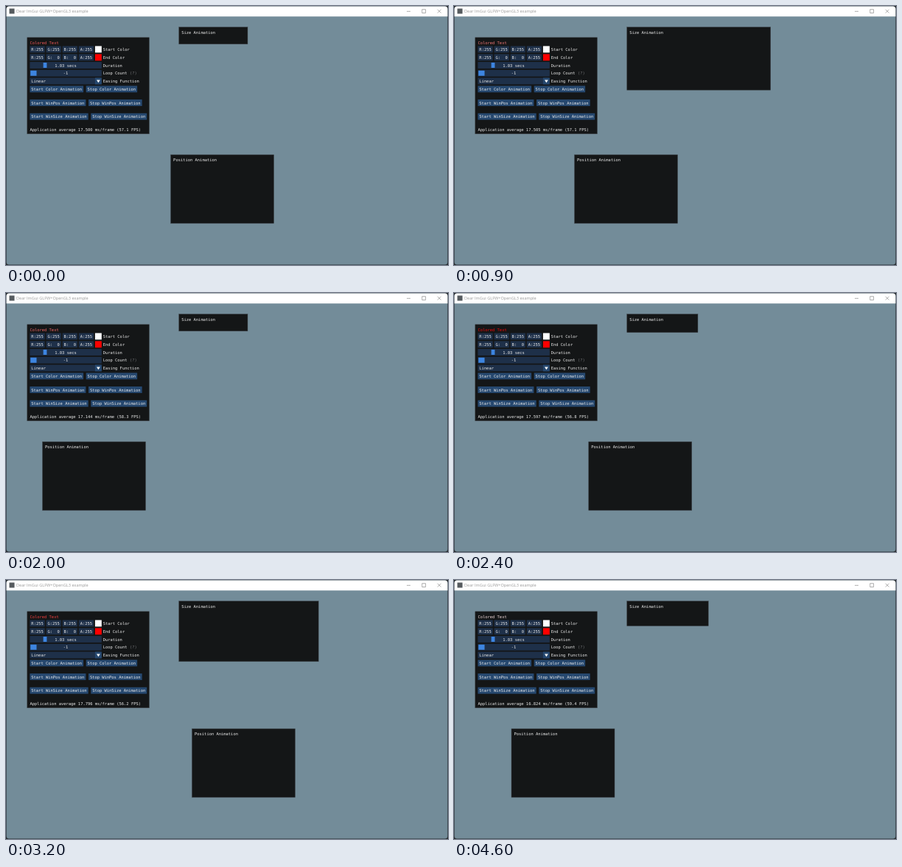
These frames come from a looping animation (600x352 px, 4.7 s). An HTML page:

```html
<!DOCTYPE html>
<html lang="en">
<head>
<meta charset="utf-8">
<title>Animated windows</title>
<style>
  html, body { margin: 0; width: 100%; height: 100%; overflow: hidden; background: #24292c; }
  svg { display: block; width: 600px; height: 352px; }
  text { font: 5.45px "DejaVu Sans Mono", monospace; fill: #e8e8e8; white-space: pre; }
  .title { font: 5.6px "Open Sans", sans-serif; fill: #999; }
  .mid { text-anchor: middle; }
  .dim { fill: #707274; }
  .window { fill: #141617; stroke: #3c4046; stroke-width: .5; }
  .frame { fill: #1e3049; }
  .button { fill: #26486f; }
  .grab { fill: #3d85e0; }
  .control { fill: none; stroke: #777; stroke-width: .6; }
</style>
</head>
<body>
<svg id="stage" viewBox="0 0 600 352">
  <rect x=".6" y=".4" width="598.8" height="351" rx="3.5" fill="#738c99"/>
  <path d="M.6 14.3V3.9a3.5 3.5 0 0 1 3.5-3.5H595.9a3.5 3.5 0 0 1 3.5 3.5V14.3z" fill="#fff"/>
  <rect x="4.5" y="3.5" width="7" height="7" fill="#555a5e"/>
  <text class="title" x="14" y="9.3">Dear ImGui GLFW+OpenGL3 example</text>
  <path class="control" d="M544 7.3h5M564.8 4.7h4.8v4.8h-4.8zM585.8 4.7l4.8 4.8m0-4.8l-4.8 4.8"/>
  <rect class="window" x="28.8" y="42.8" width="165.6" height="131"/>
  <g id="panel"></g>
  <g>
    <rect id="sizer" class="window" x="234.8" y="28.7"/>
    <text x="238.2" y="37.6">Size Animation</text>
  </g>
  <g id="mover">
    <rect class="window" x="0" y="202.1" width="140" height="93.2"/>
    <text x="3.5" y="210.7">Position Animation</text>
  </g>
</svg>
<script>
const LOOP = 4700, STEP = 100;
const LEFT = 32.4, ROW_H = 8.9, CHAR_W = 3.281;
const panel = document.getElementById('panel');
const sizer = document.getElementById('sizer');
const mover = document.getElementById('mover');

function add(tag, attrs, content = '') {
  const el = document.createElementNS('http://www.w3.org/2000/svg', tag);
  for (const key in attrs) el.setAttribute(key, attrs[key]);
  el.textContent = content;
  return panel.appendChild(el);
}

// Rows are placed by their vertical centre.
const label = (x, cy, content, cls = '') => add('text', { x, y: cy + 2, class: cls }, content);
const box = (x, cy, width, cls, height = ROW_H) =>
  add('rect', { x, y: cy - height / 2, width, height, class: cls });

function colorRow(cy, cells, swatch, name) {
  cells.forEach((cell, i) => {
    const x = LEFT + i * 22.1;
    box(x, cy, 20.3, 'frame');
    label(x + 10.15, cy, cell, 'mid');
  });
  box(120.9, cy, ROW_H, '').setAttribute('fill', swatch);
  label(131.7, cy, name);
}

function slider(cy, value, grabX, grabW, name) {
  box(LEFT, cy, 97.4, 'frame');
  box(grabX, cy, grabW, 'grab', 7);
  label(81, cy, value, 'mid');
  label(131.7, cy, name);
}

function buttonRow(cy, ...names) {
  let x = LEFT;
  for (const name of names) {
    const width = name.length * CHAR_W + 3.8;
    box(x, cy, width, 'button');
    label(x + 1.9, cy, name);
    x += width + 3.6;
  }
}

const colored = label(LEFT, 49.5, 'Colored Text');
colorRow(58.9, ['R:255', 'G:255', 'B:255', 'A:255'], '#fff', 'Start Color');
colorRow(69.8, ['R:255', 'G:  0', 'B:  0', 'A:255'], '#f00', 'End Color');
slider(80.5, '1.03 secs', 50.6, 4.8, 'Duration');
slider(91.3, '-1', 33.2, 8.3, 'Loop Count');
label(168, 91.3, '(?)', 'dim');
box(LEFT, 102, 97.4, 'frame');
box(120.9, 102, ROW_H, 'button');
add('path', { d: 'M123 100.4h4.8l-2.4 3.9z', fill: '#fff' });
label(34.3, 102, 'Linear');
label(131.7, 102, 'Easing Function');
buttonRow(112.9, 'Start Color Animation', 'Stop Color Animation');
buttonRow(131.5, 'Start WinPos Animation', 'Stop WinPos Animation');
buttonRow(150.2, 'Start WinSize Animation', 'Stop WinSize Animation');
const stats = label(LEFT, 167.6, '');

const mod = (a, b) => ((a % b) + b) % b;
const pingPong = (t, start, span) => 1 - Math.abs(mod(t - start, 2 * span) / span - 1);

// Average frame time in ms, as [time, value].
const timings = [[0, 17.5], [500, 17.487], [1200, 17.518], [2000, 17.144],
                 [2700, 17.937], [3200, 17.796], [4600, 16.824]];

function frameTime(t) {
  const i = timings.findIndex(([time]) => time >= t);
  if (i < 1) return timings[0][1];
  const [t0, a] = timings[i - 1], [t1, b] = timings[i];
  return a + (b - a) * (t - t0) / (t1 - t0);
}

function draw(t) {
  const grow = pingPong(t, 40, 1002) ** 4;
  sizer.setAttribute('width', 93.2 + 187.5 * grow);
  sizer.setAttribute('height', 23.1 + 115 * grow);

  const x = 9.2 + 450 * pingPong(t, 1628, 1243) ** 2;
  mover.setAttribute('transform', `translate(${x.toFixed(2)} 0)`);

  const fade = Math.round(240 * (1 - mod(t - 380, 1030) / 1030));
  colored.style.fill = `rgb(240 ${fade} ${fade})`;

  const ms = frameTime(t);
  stats.textContent =
    `Application average ${ms.toFixed(3)} ms/frame (${(1000 / ms).toFixed(1)} FPS)`;
}

const origin = performance.now();
function tick() {
  const t = (performance.now() - origin) % LOOP;
  draw(Math.floor(t / STEP) * STEP);
  requestAnimationFrame(tick);
}
tick();
</script>
</body>
</html>
```
